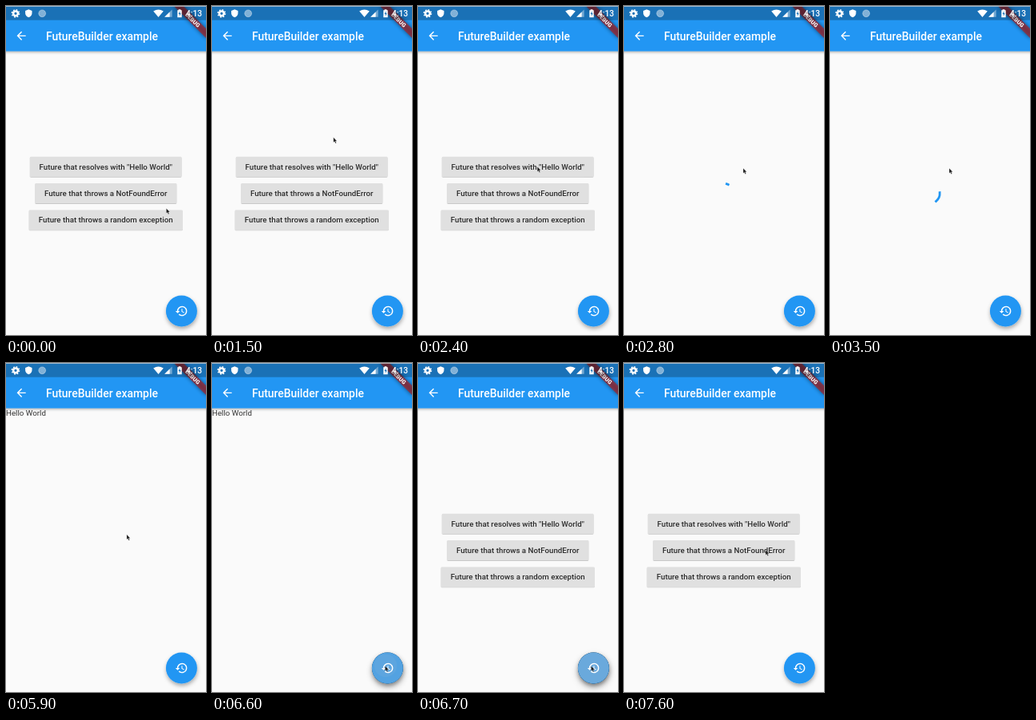
Write an HTML page that moves like this. It is 250x412 px and loops after 8 s.

```html
<!DOCTYPE html>
<html lang="en">
<head>
<meta charset="utf-8">
<title>FutureBuilder example</title>
<style>
  html, body { margin: 0; width: 100%; height: 100%; overflow: hidden; background: #fafafa; }
  svg { display: block; width: 100%; height: 100%; }
  text { font-family: Roboto, "Noto Sans", sans-serif; }
  .title { font-size: 13.9px; font-weight: 500; fill: #fff; }
  .label { font-size: 9.72px; font-weight: 500; fill: #2c2c2c; text-anchor: middle; }
  .result { font-size: 9.72px; fill: #333; }
  .clock { font-size: 10.2px; font-weight: 500; fill: #fff; }
  .debug { font-size: 7.08px; font-weight: 900; fill: #fff; text-anchor: middle; }
</style>
</head>
<body>
<svg viewBox="0 0 250 412">
  <defs>
    <filter id="low" x="-10%" y="-30%" width="120%" height="180%">
      <feDropShadow dx="0" dy=".8" stdDeviation=".7" flood-opacity=".25"/>
    </filter>
    <filter id="high" x="-40%" y="-40%" width="180%" height="200%">
      <feDropShadow dx=".4" dy="2.8" stdDeviation="2.4" flood-opacity=".33"/>
    </filter>
    <filter id="raised" x="-60%" y="-60%" width="220%" height="240%">
      <feDropShadow dx=".4" dy="4.5" stdDeviation="4" flood-opacity=".3"/>
    </filter>
    <filter id="bar" x="-5%" y="-10%" width="110%" height="140%">
      <feDropShadow dx="0" dy="1.3" stdDeviation="1.4" flood-opacity=".32"/>
    </filter>
    <filter id="blur" x="-50%" y="-150%" width="200%" height="400%">
      <feGaussianBlur stdDeviation="2.4"/>
    </filter>
  </defs>
  <rect width="250" height="412" fill="#fafafa"/>

  <g id="menu"></g>
  <path id="spinner" fill="none" stroke="#2196f3" stroke-width="2.8" stroke-linecap="square"/>
  <text id="result" class="result" x="0" y="65.8">Hello World</text>

  <!-- App bar -->
  <rect x="-10" y="-10" width="270" height="66.6" fill="#2196f3" filter="url(#bar)"/>
  <path transform="translate(10.8 29) scale(.694)" fill="#fff"
    d="M20 11H7.83l5.59-5.59L12 4l-8 8 8 8 1.41-1.41L7.83 13H20z"/>
  <text class="title" x="50" y="42.8">FutureBuilder example</text>

  <!-- Floating button -->
  <circle id="lift" cx="219.4" cy="382" r="19.5" filter="url(#raised)"/>
  <circle cx="219.4" cy="382" r="19.5" fill="#2196f3" filter="url(#high)"/>
  <g id="fabInk"></g>
  <path transform="translate(211.1 373.7) scale(.694)" fill="#fff"
    d="M13 3a9 9 0 0 0-9 9H1l3.9 3.9.1.1 4-4H6a7 7 0 1 1 2.06 4.94l-1.42 1.42A9 9 0 1 0 13 3zm-1 5v5l4.28 2.54.72-1.21-3.5-2.08V8z"/>

  <!-- Banner and status bar -->
  <g transform="translate(250 .8) rotate(45)">
    <rect x="-28" y="19.4" width="56" height="8.4" opacity=".5" filter="url(#blur)"/>
    <rect x="-28" y="19.4" width="56" height="8.4" fill="#b71c1c" fill-opacity=".63"/>
    <text class="debug" x="0" y="26.1">DEBUG</text>
  </g>
  <rect width="250" height="17.7" opacity=".25"/>
  <rect width="250" height=".7" fill="#dcdcdc"/>
  <g fill="#fff">
    <circle cx="12" cy="9.3" r="2.9" fill="none" stroke="#fff" stroke-width="2.5"/>
    <circle cx="12" cy="9.3" r="4.6" fill="none" stroke="#fff" stroke-width="1.5" stroke-dasharray="1.806"/>
    <path d="M28.3 4.2l4.2 1.8v3.1c0 2.4-1.8 4.5-4.2 5.2c-2.4-.7-4.2-2.8-4.2-5.2V6z"/>
    <circle cx="45.2" cy="9.3" r="4.4" fill-opacity=".45" stroke="#fff" stroke-opacity=".4" stroke-width=".9"/>
    <path d="M184.2 6.6q6.3-4.4 12.6 0l-6.3 7.4z"/>
    <path d="M207.6 4.4v9.4h-9.4z" fill-opacity=".4"/>
    <path d="M204.6 7.4v6.4h-6.4z"/>
    <path d="M215.6 4.2h2.8v1h1.3v9h-5.4v-9h1.3z"/>
    <path d="M217.5 6.2l-1.9 3.8h1.2v3l1.8-3.9h-1.1z" fill="#1971b6"/>
  </g>
  <text class="clock" x="225" y="13">4:13</text>

  <path id="cursor" d="M0 0v6.2l1.4-1.2 1.1 2.4 1.1-.5-1.1-2.3h1.9z" fill="#1a1a1a"
    stroke="#fff" stroke-opacity=".6" stroke-width=".4"/>
</svg>
<script>
const LOOP = 8000, TICK = 100;
const LOAD = 2744, LOADED = 4744, RESET = 6650;
const MENU_PRESS = { down: 2560, up: LOAD }, FAB_PRESS = { down: 6480, up: 6700 };
const SPIN = { x: 124.7, y: 234.8, r: 12.5, period: 1000 };
const byId = id => document.getElementById(id);
const clamp = v => Math.max(0, Math.min(1, v));
const ramp = (t, from, to) => clamp((t - from) / (to - from));
const pressLevel = (t, { down, up }) => ramp(t, down, down + 150) * (1 - ramp(t, up, up + 250));

function add(parent, tag, attrs, text = "") {
  const node = document.createElementNS("http://www.w3.org/2000/svg", tag);
  for (const key in attrs) node.setAttribute(key, attrs[key]);
  node.textContent = text;
  return parent.appendChild(node);
}

// A press: the surface greys while a splash grows from the pointer.
function makeInk(parent, tag, shape, x, y, reach, press) {
  const clip = add(parent, "clipPath", { id: "clip" + x });
  add(clip, tag, shape);
  const layer = add(parent, "g", { "clip-path": `url(#clip${x})` });
  const tint = add(layer, tag, { ...shape, fill: "#bcbcbc" });
  const splash = add(layer, "circle", { cx: x, cy: y, fill: "#c8c8c8" });
  return t => {
    const level = pressLevel(t, press);
    tint.setAttribute("opacity", .4 * level);
    splash.setAttribute("opacity", .1 * level);
    splash.setAttribute("r", reach * ramp(t, press.down, press.down + 220));
  };
}

const menu = byId("menu");
const buttons = [
  ['Future that resolves with "Hello World"', 29.8, 189.8],
  ["Future that throws a NotFoundError", 36.2, 177.2],
  ["Future that throws a random exception", 28.6, 192.2]
].map(([label, x, width], i) => {
  const shape = { x, y: 188.8 + i * 33.3, width, height: 24.9, rx: 1.4 };
  add(menu, "rect", { ...shape, fill: "#e0e0e0", filter: "url(#low)" });
  const group = add(menu, "g", {});
  add(menu, "text", { class: "label", x: 124.7, y: 204.8 + i * 33.3 }, label);
  return { shape, group };
});

const inks = [
  makeInk(buttons[0].group, "rect", buttons[0].shape, 149, 203, 110, MENU_PRESS),
  makeInk(byId("fabInk"), "circle", { cx: 219.4, cy: 382, r: 19.5 }, 217, 379, 26, FAB_PRESS)
];

// Pointer stops: time, x, y
const stops = [
  [300, 200.4, 253.4], [700, 186, 228], [800, 186, 228], [900, 174, 208], [1000, 174, 208],
  [1500, 151.8, 164.6], [1900, 151, 176], [2500, 149, 203.2], [4600, 149, 203.2],
  [4800, 149.8, 212], [5850, 149.8, 212], [6500, 216.4, 379.4], [6750, 216.4, 379.4],
  [7600, 177, 234.2]
];

function pointer(t) {
  const i = stops.findIndex(stop => stop[0] > t);
  if (i < 1) return (i ? stops[stops.length - 1] : stops[0]).slice(1);
  const [t0, x0, y0] = stops[i - 1], [t1, x1, y1] = stops[i];
  const k = ramp(t, t0, t1), e = k * k * (3 - 2 * k);
  return [x0 + (x1 - x0) * e, y0 + (y1 - y0) * e];
}

// cubic-bezier(.4, 0, .2, 1), solved by bisection
function fastOutSlowIn(x) {
  let lo = 0, hi = 1, u = .5;
  for (let i = 0; i < 20; i++) {
    u = (lo + hi) / 2;
    const at = 1.2 * u * (1 - u) ** 2 + .6 * u * u * (1 - u) + u ** 3;
    if (at < x) lo = u; else hi = u;
  }
  return 3 * u * u * (1 - u) + u ** 3;
}

function arcPath(elapsed) {
  const cycle = Math.max(0, elapsed / SPIN.period);
  const step = Math.floor(cycle), s = cycle - step;
  const head = fastOutSlowIn(clamp(s * 2));
  const tail = s > .5 ? fastOutSlowIn(s * 2 - 1) : 0;
  const start = Math.PI * (-.5 + 1.5 * tail + 1.7 * s - .8 * step);
  const sweep = Math.max(1.5 * Math.PI * (head - tail), .01);
  const point = a => `${SPIN.x + SPIN.r * Math.cos(a)} ${SPIN.y + SPIN.r * Math.sin(a)}`;
  return `M${point(start)}A${SPIN.r} ${SPIN.r} 0 ${+(sweep > Math.PI)} 1 ${point(start + sweep)}`;
}

function show(id, visible) {
  byId(id).style.display = visible ? "" : "none";
}

function render(t) {
  const loading = t >= LOAD && t < LOADED;
  show("menu", t < LOAD || t >= RESET);
  show("spinner", loading);
  show("result", t >= LOADED && t < RESET);
  if (loading) byId("spinner").setAttribute("d", arcPath(t - LOAD));
  inks.forEach(ink => ink(t));
  byId("lift").setAttribute("opacity", pressLevel(t, FAB_PRESS));
  byId("cursor").setAttribute("transform", `translate(${pointer(t)})`);
}

const began = performance.now();
function frame() {
  const t = (performance.now() - began) % LOOP;
  render(Math.floor(t / TICK) * TICK);
  requestAnimationFrame(frame);
}
render(0);
requestAnimationFrame(frame);
</script>
</body>
</html>
```
